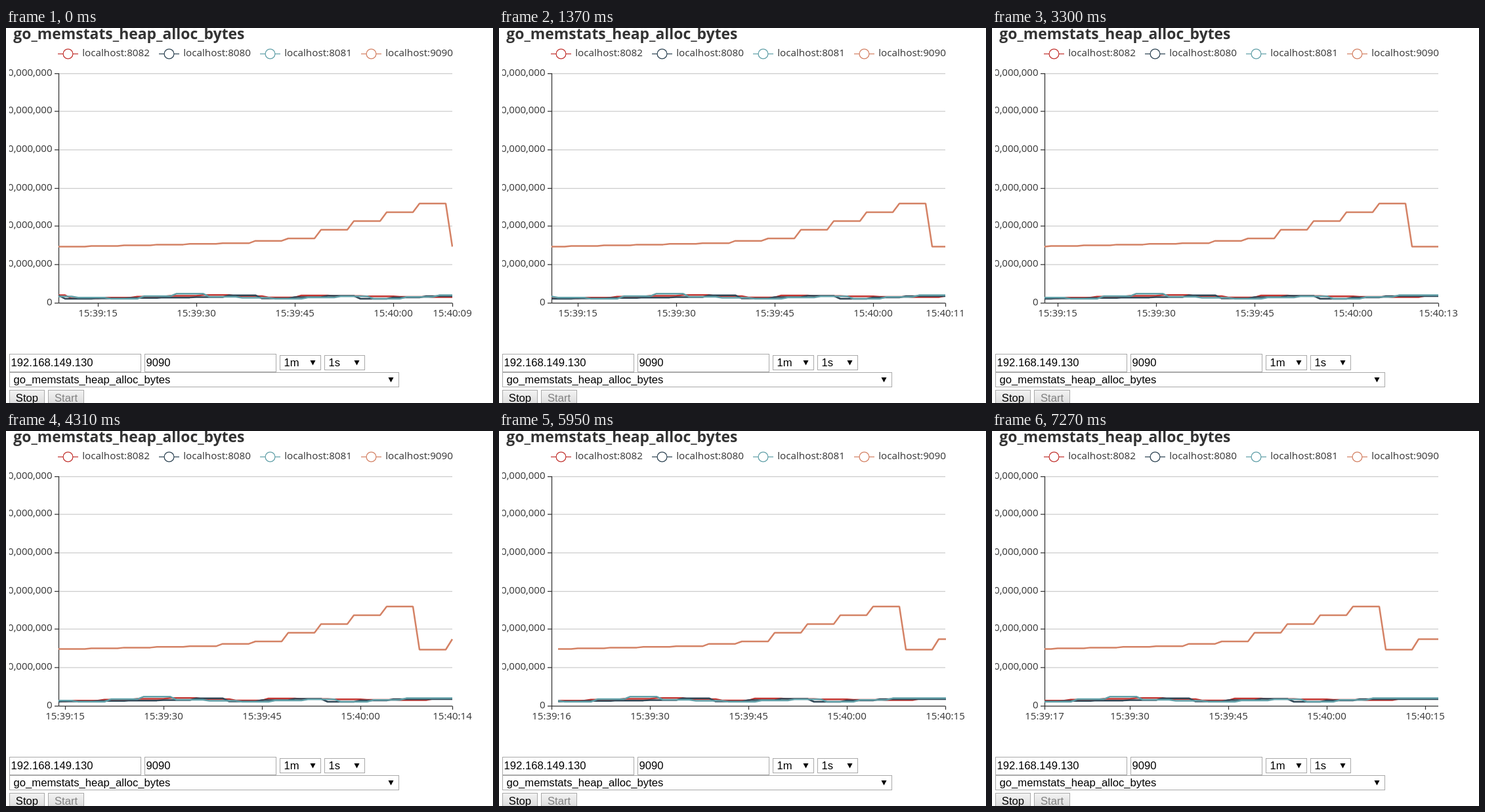
These frames come from a looping animation (742x572 px, 7.8 s). An HTML page:

```html
<!DOCTYPE html>
<html lang="en">
<head>
<meta charset="utf-8">
<title>Heap chart</title>
<style>
  html, body { margin: 0; width: 100%; height: 100%; overflow: hidden; background: #fff; }
  svg { display: block; }
  .chart { font: 15px "Open Sans", "Noto Sans", sans-serif; fill: #333; }
  .legend { font-size: 15.25px; }
  .title { font-size: 22.9px; font-weight: 700; }
  .form { font: 16.67px "Liberation Sans", Arial, sans-serif; fill: #000; }
  .mid { text-anchor: middle; }
  .end { text-anchor: end; }
</style>
</head>
<body>
<svg id="stage" width="742" height="572" viewBox="0 0 742 572">
  <clipPath id="plot"><rect x="79" y="60" width="602" height="370"/></clipPath>
  <clipPath id="page"><rect x="5" y="0" width="737" height="572"/></clipPath>
  <linearGradient id="face" x2="0" y2="1">
    <stop stop-color="#f3f3f3"/><stop offset="1" stop-color="#d8d8d8"/>
  </linearGradient>
</svg>
<script>
const LOOP = 7800, LEFT = 80, RIGHT = 680, TOP = 69.6, BASE = TOP + 350;
const FIRST = 9, SPAN = 60, SECOND = 10; // start after 15:39:00, window in seconds, pixels per second
const SLIDE = 288, STEP = 72; // length of one slide and of its steps, ms
const slideStarts = [70, 990, 2000, 3000, 4010, 5020, 5950, 6960];

// A server reports every five seconds from `from` on; keys are [report, height].
const series = [
  { name: 'localhost:8082', color: '#c23531', from: 6,
    keys: [[0, 407.5], [1, 412.5], [5, 407.2], [7, 411], [8, 408], [12, 410.5], [13, 408.6]] },
  { name: 'localhost:8080', color: '#2f4554', from: 5,
    keys: [[0, 408], [1, 413], [5, 410.5], [6, 407.7], [7, 412.5], [9, 408.5], [10, 413], [12, 409]] },
  { name: 'localhost:8081', color: '#61a0a8', from: 7,
    keys: [[0, 409.5], [2, 413], [4, 405.2], [5, 410], [7, 413], [9, 409.2], [10, 413], [12, 407.6]] },
  { name: 'localhost:9090', color: '#d48265', from: 9,
    keys: [[0, 333.5], [5, 328.3], [7, 321], [11, 267.8], [12, 333.5], [13, 317.5]] }
];

const stage = document.getElementById('stage');

function add(parent, tag, attrs, text) {
  const el = document.createElementNS('http://www.w3.org/2000/svg', tag);
  for (const key in attrs) el.setAttribute(key, attrs[key]);
  if (text) el.textContent = text;
  return parent.appendChild(el);
}

const path = (parent, d, stroke, width = 1.25) =>
  add(parent, 'path', { d, stroke, 'stroke-width': width, 'stroke-linejoin': 'bevel', fill: 'none' });

const label = (parent, x, y, text, cls = '', attrs = {}) =>
  add(parent, 'text', { x, y, class: cls, ...attrs }, text);

function drawChartFrame() {
  const g = add(stage, 'g', { class: 'chart', 'clip-path': 'url(#page)' });
  label(g, 11.3, 17, 'go_memstats_heap_alloc_bytes', 'title');
  series.forEach(({ name, color }, i) => {
    const x = 79 + i * 154;
    path(g, `M${x} 39.5h31`, color);
    add(g, 'circle', { cx: x + 15.5, cy: 39.5, r: 7.4, fill: '#fff', stroke: color, 'stroke-width': 1.25 });
    label(g, x + 37.2, 43, name, 'legend');
  });
  for (let i = 0; i <= 6; i++) {
    const y = TOP + 1.25 * Math.round(i * 280 / 6 - 0.4);
    if (i < 6) path(g, `M${LEFT} ${y}H${RIGHT}`, '#ccc');
    path(g, `M74 ${y}H${LEFT}`, '#333');
    label(g, 70.5, y + 3.3, i < 6 ? `${60 - i * 10},000,000` : '0', 'end');
  }
}

function drawForm() {
  const g = add(stage, 'g', { class: 'form' });
  const box = (x, y, w, h, fill = '#fff') =>
    add(g, 'rect', { x: x + 0.5, y: y + 0.5, width: w - 1, height: h - 1, fill, stroke: '#a9a9a9' });
  const field = (x, text) => {
    box(x, 497, 201, 28);
    label(g, x + 2.5, 516, text);
  };
  const select = (x, y, w, text) => {
    box(x, y, w, 23);
    label(g, x + 6.5, y + 17, text);
    add(g, 'path', { d: `M${x + w - 16.5} ${y + 8}h8l-4 7.5z` });
  };
  const button = (x, w, text, fill) => {
    box(x, 552, w, 26, 'url(#face)');
    label(g, x + w / 2, 570, text, 'mid', { fill });
  };
  field(5, '192.168.149.130');
  field(211, '9090');
  select(417, 499, 63, '1m');
  select(485, 499, 62, '1s');
  select(5, 525, 594, 'go_memstats_heap_alloc_bytes');
  button(5, 54, 'Stop', '#000');
  button(64, 55, 'Start', '#808080');
}

drawChartFrame();
const axis = add(stage, 'g', { class: 'chart' });
path(stage, `M${LEFT + 0.5} 69V${BASE}H${RIGHT}`, '#333');
const plot = add(stage, 'g', { 'clip-path': 'url(#plot)' });
const lines = series.map(s => path(plot, '', s.color, 2.5));
drawForm();

const clock = s => `15:${39 + Math.floor(s / 60)}:${String(s % 60).padStart(2, '0')}`;

// Straight interpolation between key points, level after the last one.
function heightAt(keys, k) {
  const next = keys.findIndex(([at]) => at >= k);
  if (next < 0) return keys.at(-1)[1];
  const [b, yb] = keys[next], [a, ya] = keys[Math.max(0, next - 1)];
  return b === k ? yb : ya + (yb - ya) * (k - a) / (b - a);
}

// Whole seconds already begun, and the eased position of the view.
function viewAt(t) {
  const count = slideStarts.filter(start => t >= start).length;
  if (!count) return [0, 0];
  const step = Math.floor((t - slideStarts[count - 1]) / STEP);
  const p = Math.min(1, step * STEP / SLIDE);
  return [count, count - (1 - p) ** 3];
}

function drawAxis(count, pos) {
  const min = FIRST + count, max = min + SPAN;
  const tick = (x, s) => {
    path(axis, `M${x + 0.5} ${BASE}v5.5`, '#333');
    label(axis, x, 440, clock(s), 'mid');
  };
  axis.replaceChildren();
  const first = Math.ceil(min / 15) * 15, last = Math.floor(max / 15) * 15;
  // A tick that has just entered starts in its final place.
  for (let s = first; s <= last; s += 15) {
    tick(s === max ? RIGHT : LEFT + (s - FIRST - pos) * SECOND, s);
  }
  if (first - min > 6) tick(LEFT, min);
  if (max - last > 6) tick(RIGHT, max);
}

function drawLines(count, pos) {
  series.forEach(({ from, keys }, i) => {
    const points = Array.from({ length: SPAN + 1 }, (_, n) => {
      const s = FIRST + count + n;
      return `${LEFT + (s - FIRST - pos) * SECOND} ${heightAt(keys, Math.floor((s - from) / 5))}`;
    });
    lines[i].setAttribute('d', 'M' + points.join('L'));
  });
}

let shown;
function frame() {
  const view = viewAt(performance.now() % LOOP);
  if (String(view) !== shown) {
    shown = String(view);
    drawAxis(...view);
    drawLines(...view);
  }
  requestAnimationFrame(frame);
}
frame();
</script>
</body>
</html>
```
